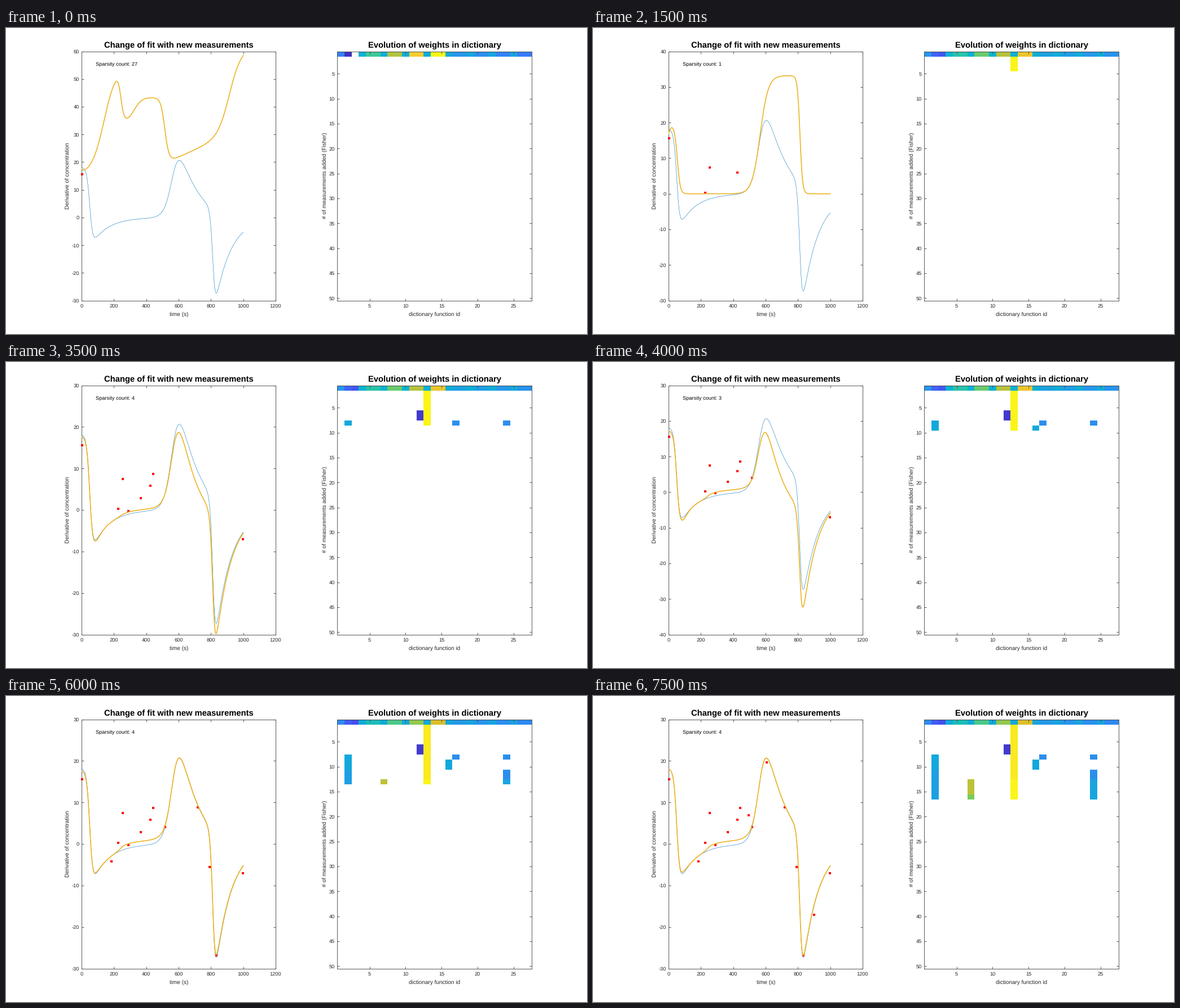
Recreate the animation shown at these times as a matplotlib script. Size 1030x544 px, loop 8 s.

```python
import numpy as np
import matplotlib.pyplot as plt
from matplotlib.animation import FuncAnimation
from matplotlib.colors import LinearSegmentedColormap

W, H, DPI = 1030, 544, 100
PT = 72 / DPI  # points per pixel
STEPS, STEP_MS = 16, 500
INK, FRAME = (0.15, 0.15, 0.15), "#484848"

plt.rcParams.update({
    "font.family": "Liberation Sans",
    "text.hinting": "none",
    "axes.unicode_minus": False,
    "axes.edgecolor": FRAME,
    "axes.linewidth": .9 * PT,
})

PARULA = LinearSegmentedColormap.from_list("parula", [
    (.24, .15, .66), (.28, .28, .92), (.24, .44, 1), (.15, .59, .92), (.03, .71, .82),
    (.19, .78, .63), (.50, .80, .35), (.86, .74, .16), (.99, .81, .19), (.98, .98, .08)])
PARULA.set_bad("white")
PARULA.set_under("white")

t = np.arange(0, 1001, 2.0)


def on(center, width):
    return 1 / (1 + np.exp((center - t) / width))


def off(center, width):
    return 1 - on(center, width)


def decay(start, tau):
    return np.exp((start - t) / tau)


def bump(center, width):
    return np.exp(-((t - center) / width) ** 2)


# Two feeding pulses, each followed by an exponential washout
fall = off(812.5, 8)
hump = 18.9 * decay(640, 120) * bump(640, 330) * on(569, 23)
truth = (18.2 * off(51.5, 9.3) - 7.7 * decay(87, 100) * on(51.5, 9.3)
         + hump * fall - 29.3 * decay(834, 97) * (1 - fall))

pulses = (19.5 - 2.7 * decay(0, 12)) * off(54, 9) + 33.2 * on(566, 25) * fall
sag = .22 * (off(235, 10) + on(520, 12))

ramp = .026 * 12 * np.logaddexp(0, (t - 560) / 12)
dense = (15.5 + 1.3 * decay(0, 8) + 39 * on(139, 38)
         - on(241, 9) * (11.2 + 6.7 * bump(280, 65))
         - 22.5 * on(514.5, 12.5) + ramp + 28.5 * on(913, 35))

# Errors of the later fits: start, first dip, plateau, hump, last dip
PARTS = np.array([off(50, 8), bump(90, 30), on(240, 12) * off(505, 15),
                  on(600, 35) * fall, decay(834, 80) * (1 - fall)])
LOW = (-.8, -.7, 1, -7.7, -4.6)
KEYS = [6, 8, 9, 10, 12, 15]
ERRORS = np.array([(0,) * 5, LOW, LOW, (-.8, .8, .9, -1.2, 1.9),
                   (-.5, .2, 1.1, .15, .7), (0, .4, 1.1, .1, .5)])

SAMPLES = np.array([
    (5, 15.6), (228, .3), (427, 5.9), (254, 7.45), (290, -.3), (442, 8.65),
    (367, 2.9), (997, -7), (518, 4.05), (720, 8.85), (185, -4.2), (832, -26.8),
    (792, -5.5), (900, -17), (497, 6.95), (607, 19.65)])

# column, first row, last row, level (below zero is drawn white)
CELLS = [(3, 3, 3, -1), (12, 6, 7, .07), (2, 8, 10, .40), (2, 11, 16, .365),
         (17, 8, 8, .31), (24, 8, 8, .31), (16, 9, 10, .40), (24, 11, 12, .31),
         (24, 13, 16, .39), (7, 13, 15, .74), (7, 16, 16, .66)]


def first_row():
    col = np.arange(27)
    group = col // 3
    pair = np.where(group < 5, .315 + .115 * group, .35 - .02 * group)
    row = np.where(col % 3 == 0, .33 - .005 * group, pair)
    row[:3] = .2, .03, -.01
    return row


def weights(n):
    grid = np.full((50, 27), np.nan)
    gain, base = (1.33, 0) if n == 0 else (1, 0) if n == 1 else (.87, .16) if n < 12 else (.83, .14)
    grid[0] = np.minimum(first_row() * gain + base, .99)
    grid[1:n + 1, 12] = .985
    if n >= 12:
        grid[1:12, 12] = .96
    for col, a, b, level in CELLS:
        grid[a - 1:min(b, n + 1), col - 1] = level
    return grid


def fitted(n, active):
    if n == 0:
        return dense
    if n < 7:
        return pulses - sag * (active > 1)
    return truth + [np.interp(n, KEYS, e) for e in ERRORS.T] @ PARTS


fig = plt.figure(figsize=(W / DPI, H / DPI), dpi=DPI, facecolor="white")


def panel(x0, x1, y0=41.6, y1=484.6):
    ax = fig.add_axes([x0 / W, 1 - y1 / H, (x1 - x0) / W, (y1 - y0) / H])
    ax.tick_params(direction="in", top=True, right=True, length=3.6 * PT,
                   width=.9 * PT, color=FRAME, labelcolor=INK, labelsize=9.3 * PT)
    ax.tick_params(axis="x", pad=5.4 * PT)
    ax.tick_params(axis="y", pad=4 * PT)
    return ax


def label(x, y, text, size=9.95, **kw):
    opts = dict(ha="center", va="baseline", color=INK)
    opts.update(kw)
    return fig.text(x / W, 1 - y / H, text, fontsize=size * PT, **opts)


left = panel(134, 478)
left.set_xlim(0, 1200)
left.set_xticks(range(0, 1201, 200))
left.plot(t, truth, color="#0072BD", lw=.55 * PT, zorder=3)
dots, = left.plot([], [], "s", color="red", ms=4.6 * PT, mew=0, zorder=4, clip_on=False)
fit, = left.plot([], [], color="#EDB120", lw=1.6 * PT, zorder=5)

right = panel(587, 932)
image = right.imshow(weights(0), cmap=PARULA, vmin=0, vmax=1, aspect="auto",
                     interpolation="nearest", extent=(.5, 27.5, 50.5, .5), zorder=0)
right.set_xticks(range(5, 26, 5))
right.set_yticks(range(5, 51, 5))

for x, title, xlabel in [(306.3, "Change of fit with new measurements", "time (s)"),
                         (759.5, "Evolution of weights in dictionary", "dictionary function id")]:
    label(x, 36, title, 14.8, weight="bold", color="black")
    label(x, 511.8, xlabel)
for x, ylabel in [(109, "Derivative of concentration"),
                  (565, "# of measurements added (Fisher)")]:
    label(x, 262.5, ylabel, rotation=90, va="center")
count = label(159.3, 67, "", 9.3, ha="left", color="black")


def update(n):
    grid = weights(n)
    active = np.isfinite(grid[n]).sum()
    y = fitted(n, active)
    lo = int(np.floor(min(y.min(), truth.min()) / 10)) * 10
    hi = int(np.ceil(max(y.max(), truth.max()) / 10)) * 10
    left.set_ylim(lo, hi)
    left.set_yticks(range(lo, hi + 1, 10))
    fit.set_data(t, y)
    dots.set_data(*SAMPLES[:n + 1].T)
    image.set_data(np.ma.masked_invalid(grid))
    count.set_text(f"Sparsity count: {active}")
    return fit, dots, image, count


anim = FuncAnimation(fig, update, frames=STEPS, init_func=lambda: update(0),
                     interval=STEP_MS, repeat=True, repeat_delay=0, blit=False)
plt.show()
```
